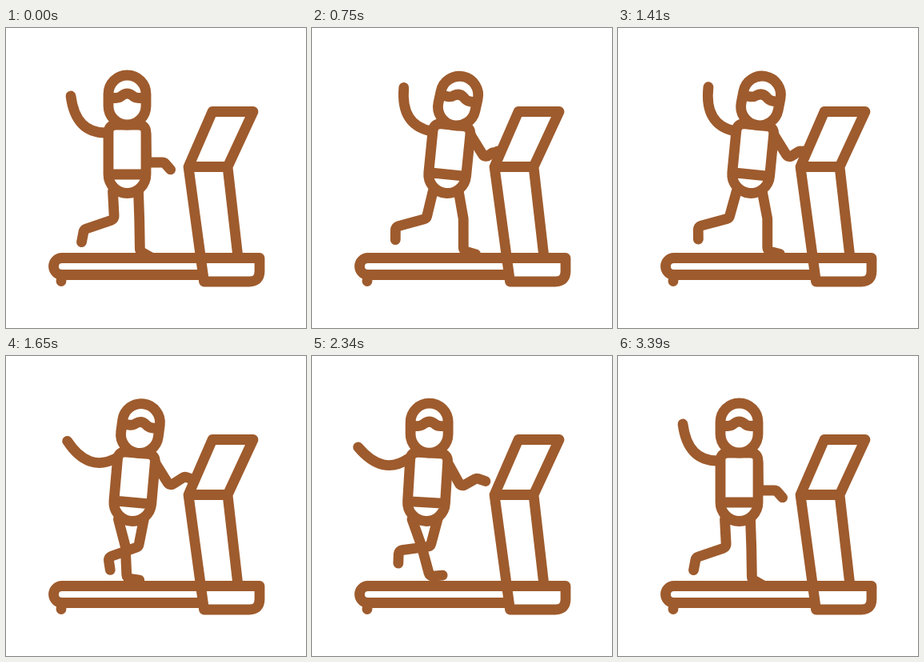
An HTML page with a canvas for the animation above (3.6 s loop, 375 by 375 pixels).

```html
<!DOCTYPE html>
<html lang="en">
<head>
<meta charset="utf-8">
<title>Treadmill runner</title>
<style>
  html, body { margin: 0; width: 100%; height: 100%; overflow: hidden; background: #fff; }
  canvas { display: block; }
</style>
</head>
<body>
<canvas id="stage" width="375" height="375"></canvas>
<script>
const ctx = document.getElementById('stage').getContext('2d');
const LOOP = 3600, STEP = 30, RUN = 3240, STRIDE = RUN / 5;
const HANDLE_X = 232;

const machine = new Path2D(`M245 308.5H70A10.5 10.5 0 0 1 70 287.5H317V304Q317 317 304 317H247.5
  L228 173.5L258 104.5H309L277 173.5H228M277 173.5L290 287M69 316v.5`);
const torso = new Path2D(`M128 183V131Q128 121 138 121H165Q175 121 175 131V183
  A23.5 23.5 0 0 1 128 183H175`);
const head = new Path2D(`M128 82.5A23.5 23.5 0 0 1 175 82.5V97.5A23.5 23.5 0 0 1 128 97.5Z
  M128 87.5H137Q142 87.5 145 84.5Q151.5 79.5 158 84.5Q161 87.5 166 87.5H175`);
const raisedArm = new Path2D('M2 0Q-37 1 -43 -46');

// Joint angles over one stride; limbs hang at 0 degrees, forward is positive
const phases = [0, .18, .61, .66, .92, 1];
const gait = {
  rearThigh: [3, -16, 20, 4, -5],
  rearShin: [-71, -75, 16, -23, -45],
  frontThigh: [2, 11, -15, -9, 2],
  frontShin: [1, 0, -83, -49, -23],
  ankle: [60, 76, 80, 95, 88],
  arm: [0, 14, -33, -18, 22]
};

const lerp = (a, b, k) => a + (b - a) * k;
const clamp = x => Math.max(0, Math.min(1, x));
const rad = degrees => degrees * Math.PI / 180;

function interpolate(xs, ys, x) {
  const i = Math.max(1, xs.findIndex(v => v > x));
  return lerp(ys[i - 1], ys[i % ys.length], (x - xs[i - 1]) / (xs[i] - xs[i - 1]));
}

// Chain of [length, angle] bones with softened joints
function limb(x, y, bones, maxX = Infinity) {
  ctx.beginPath();
  ctx.moveTo(x, y);
  const points = bones.map(([length, angle]) => [
    x = Math.min(maxX, x + length * Math.sin(rad(angle))),
    y += length * Math.cos(rad(angle))
  ]);
  points.slice(1).forEach((next, i) => ctx.arcTo(...points[i], ...next, 5));
  ctx.lineTo(x, y);
  ctx.stroke();
}

function leg(x, thigh, shin, ankle) {
  limb(x, 204, [[35, thigh], [40, shin], [16, shin + ankle]]);
}

function rotateAbout(x, y, degrees) {
  ctx.translate(x, y);
  ctx.rotate(rad(degrees));
  ctx.translate(-x, -y);
}

function solid(path) {
  ctx.fill(path);
  ctx.stroke(path);
}

function draw(t) {
  const time = t < RUN ? t : 0;
  const phase = time / STRIDE % 1;
  const joint = name => interpolate(phases, gait[name], phase);
  const shift = interpolate([0, 1080, 1890, 2340, RUN], [0, 25.5, -1, -8.5, 0], time);
  const reach = clamp(Math.min(time / 420, (RUN - time) / 1000));
  const lean = 4.5 * reach + .07 * shift;

  ctx.fillStyle = '#fff';
  ctx.fillRect(0, 0, 375, 375);
  ctx.strokeStyle = '#9e5b2d';
  ctx.lineWidth = 12.8;
  ctx.lineCap = ctx.lineJoin = 'round';

  ctx.save();
  ctx.translate(shift, 0);
  leg(133.5, joint('rearThigh'), joint('rearShin'), joint('ankle'));
  leg(165.5, joint('frontThigh'), joint('frontShin'), joint('ankle'));
  limb(175 + 50 * Math.sin(rad(lean)), 133, [
    [35, lerp(1, 32, reach)], [22, lerp(90, 123, reach)], [12, lerp(42, 75, reach)]
  ], HANDLE_X - shift);

  rotateAbout(151.5, 183, lean);
  ctx.save();
  ctx.translate(124, 131);
  ctx.rotate(rad(joint('arm') - lean));
  ctx.stroke(raisedArm);
  ctx.restore();
  solid(torso);
  rotateAbout(151.5, 125, .38 * shift);
  solid(head);
  ctx.restore();

  ctx.stroke(machine);
}

const origin = performance.now();
function tick() {
  const t = (performance.now() - origin) % LOOP;
  draw(Math.floor(t / STEP) * STEP);
  requestAnimationFrame(tick);
}
tick();
</script>
</body>
</html>
```
